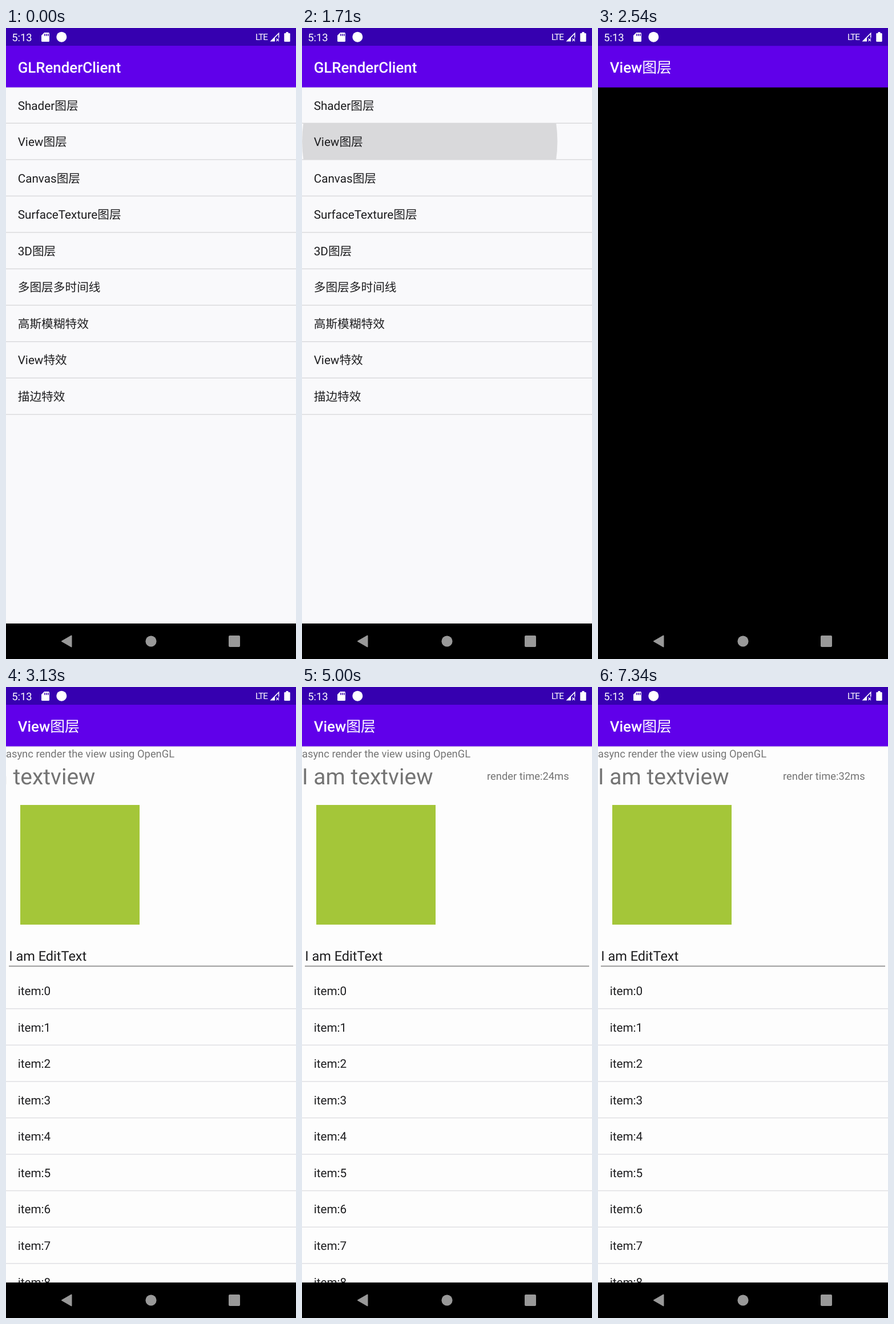
Recreate the animation shown at these times as an HTML page. Size 508 by 1102 pixels, loop 7390 ms.

```html
<!DOCTYPE html>
<html lang="zh-CN">
<head>
<meta charset="utf-8">
<title>GLRenderClient</title>
<style>
  html, body { margin: 0; width: 100%; height: 100%; overflow: hidden; background: #000; }
  svg { display: block; width: 508px; height: 1102px; }
  text {
    font: 20.7px Roboto, "Noto Sans CJK SC", "Noto Sans CJK", sans-serif;
    fill: #1d1d1f; white-space: pre; text-rendering: geometricPrecision;
  }
  .title { font-size: 25.87px; font-weight: 500; fill: #fff; }
  .title tspan { font-weight: 400; }
  .small { font-size: 18.35px; fill: #747474; }
  .big { font-size: 39.04px; fill: #747474; }
  .edit { font-size: 23.52px; }
  .sys { font-size: 18.35px; fill: #fff; }
  .lte { font-size: 15.4px; letter-spacing: -1.1px; }

  #ripple, #page, #content, #slide, #times text { animation: 7390ms linear infinite; }
  #ripple { animation-name: ripple; }
  #page { animation-name: open; transform-origin: 254px 551px; }
  #content { animation-name: content; animation-timing-function: step-end; }
  #slide { animation-name: slide; }
  #times text { animation-name: reading; animation-timing-function: step-end; }

  /* press at 1590 ms, release at 1850 ms */
  @keyframes ripple {
    0%, 21.516% { cx: 87px; r: 77px; opacity: 0; animation-timing-function: cubic-bezier(.4, 0, .2, 1); }
    21.53% { opacity: 1; }
    24.56% { cx: 254px; r: 256px; }
    25.034% { opacity: 1; }
    27.064%, 100% { cx: 254px; r: 256px; opacity: 0; }
  }
  /* window grows from 2200 to 2600 ms, fades in early on */
  @keyframes open {
    0%, 29.77% { transform: scale(.85); animation-timing-function: cubic-bezier(.3, 0, .8, .15); }
    0%, 30.447% { opacity: 0; }
    30.672% { transform: scale(.91); animation-timing-function: cubic-bezier(.05, .7, .1, 1); }
    31.123%, 100% { opacity: 1; }
    35.183%, 100% { transform: scale(1); }
  }
  /* first view drawn at 2670 ms */
  @keyframes content {
    0% { visibility: hidden; }
    36.13%, 100% { visibility: visible; }
  }
  /* out to the left and back, one sine ease from 2615 to 4615 ms */
  @keyframes slide {
    0%, 35.386% { transform: translateX(0); animation-timing-function: cubic-bezier(.362, 0, .675, .488); }
    48.917% { transform: translateX(-235.2px); animation-timing-function: cubic-bezier(.325, .512, .638, 1); }
    62.449%, 100% { transform: translateX(0); }
  }
  /* each reading stays 666 ms */
  @keyframes reading {
    0% { opacity: 1; }
    9.012%, 100% { opacity: 0; }
  }
</style>
</head>
<body>
<svg viewBox="0 0 508 1102">
  <defs>
    <clipPath id="row"><rect y="167" width="508" height="62.1"/></clipPath>
    <g id="bars">
      <rect width="508" height="103.6" fill="#6000ea"/>
      <rect width="508" height="31" fill="#3600b0"/>
      <rect y="103.6" width="508" height="1.400" fill="#30106a" opacity=".1"/>
    </g>
  </defs>

  <rect width="508" height="1102" fill="#f9f9fb"/>
  <use href="#bars"/>
  <text class="title" x="20.7" y="77.6">GLRenderClient</text>
  <g clip-path="url(#row)"><circle id="ripple" cx="87" cy="198" r="77" fill="#000" fill-opacity=".125"/></g>
  <g id="menu"></g>

  <g id="page">
    <rect width="508" height="1102"/>
    <g id="content">
      <rect y="103" width="508" height="937" fill="#fdfdfd"/>
      <text class="small" x="0" y="123.3">async render the view using OpenGL</text>
      <text class="big" id="slide" x="0" y="169.6">I am textview</text>
      <g id="times"></g>
      <rect x="25" y="206" width="209" height="209" fill="#a4c639"/>
      <text class="edit" x="5.2" y="477.7">I am EditText</text>
      <rect x="5" y="486.8" width="498" height="1.4" fill="#777"/>
      <g id="items"></g>
    </g>
    <use href="#bars"/>
    <text class="title" x="20.7" y="77.6">View<tspan>图层</tspan></text>
  </g>

  <g fill="#fff">
    <text class="sys" x="10.3" y="22.6">5:13</text>
    <path d="M67 8h7.5q1.5 0 1.5 1.5v13q0 1.5-1.5 1.5h-11q-1.5 0-1.5-1.5v-9.5z"/>
    <path d="M68 10v4M71 10v4M74 10v4" stroke="#3600b0" stroke-width="1.5"/>
    <circle cx="97.3" cy="15.7" r="9"/>
    <text class="sys lte" x="437" y="21.3">LTE</text>
    <path d="M462.5 23.5L478.5 7.5V17H477V11.2L471 17.2V23.5z"/>
    <path d="M473.5 18.5l4.5 4.5m0-4.5l-4.5 4.5" stroke="#fff" stroke-width="1.3"/>
    <path d="M490.5 7h4v2h2q1.2 0 1.2 1.2v12.6q0 1.2-1.2 1.2h-8q-1.2 0-1.2-1.2v-12.6q0-1.2 1.2-1.2h2z"/>
  </g>

  <rect y="1040" width="508" height="62"/>
  <g fill="#999">
    <path d="M98 1071L114.5 1061.5V1080.5z" stroke="#999" stroke-width="2" stroke-linejoin="round"/>
    <circle cx="254" cy="1071" r="9.6"/>
    <rect x="390" y="1061" width="20" height="20" rx="2"/>
  </g>
</svg>
<script>
  const ROW = 63.57, LOOP = 7390;
  const fill = (id, labels, draw) => {
    document.getElementById(id).innerHTML = labels.map(draw).join('');
  };
  const row = (top, line) => (label, i) => {
    const y = top + i * ROW;
    return `<text x="20.7" y="${y + 39}">${label}</text>
      <rect y="${y + 62.1}" width="508" height="1.4" fill="${line}"/>`;
  };
  fill('menu', ['Shader图层', 'View图层', 'Canvas图层', 'SurfaceTexture图层', '3D图层',
    '多图层多时间线', '高斯模糊特效', 'View特效', '描边特效'], row(103.5, '#d9d9db'));
  fill('items', Array.from({ length: 9 }, (_, i) => 'item:' + i), row(499, '#dedee2'));

  // readings follow each other from 3340 ms
  fill('times', [28, 26, 24, 27, 25, 29, 32], (ms, i) =>
    `<text class="small" x="324" y="162.4" style="animation-delay:${3340 + i * 666 - LOOP}ms">render time:${ms}ms</text>`);
</script>
</body>
</html>
```
